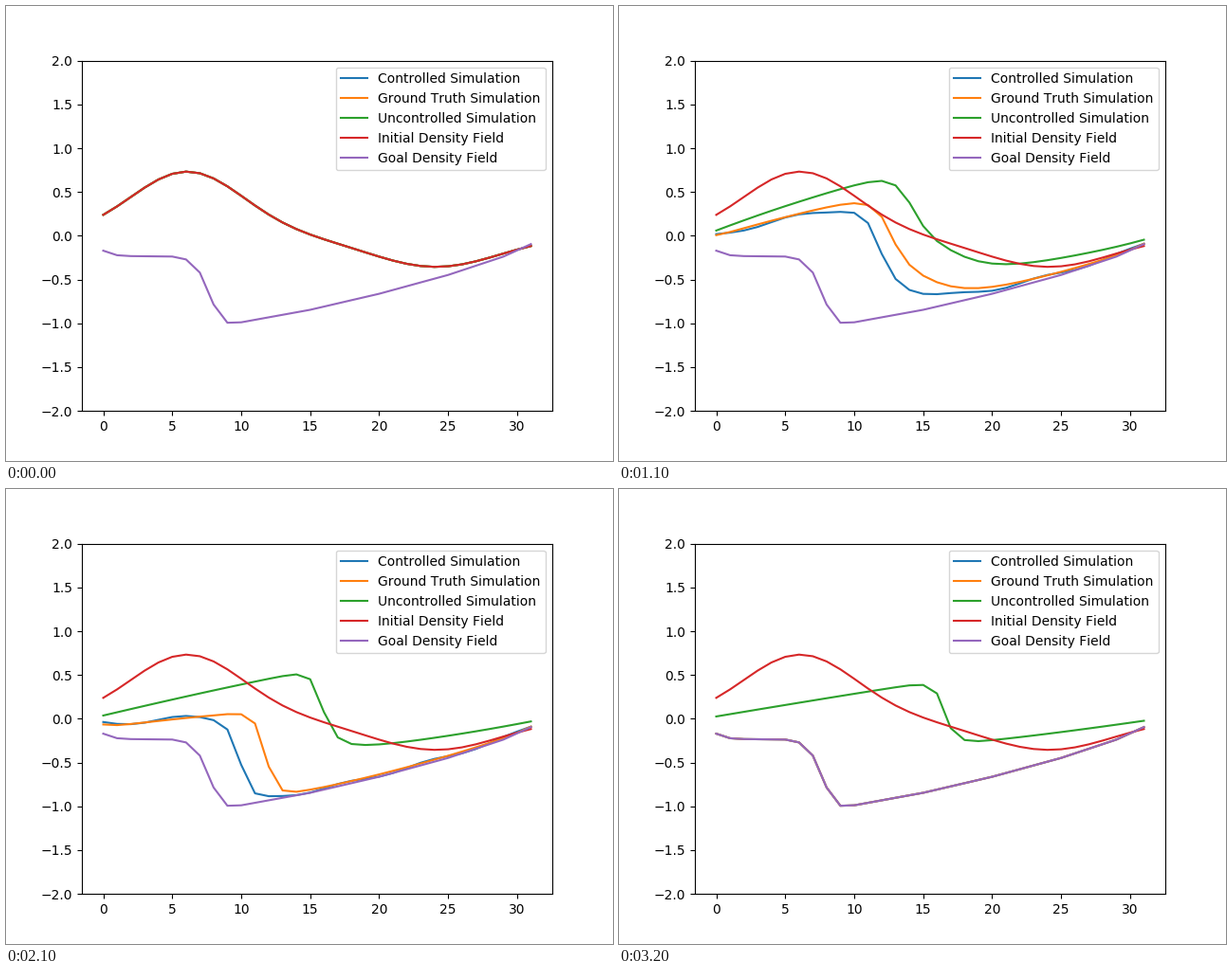
These frames come from a looping animation (640 px wide and 480 px high, 3300 ms). A matplotlib script:

```python
import numpy as np
import matplotlib.pyplot as plt
from matplotlib.animation import FuncAnimation

plt.rcParams["text.kerning_factor"] = 6

STEPS = 32
LANDING = 5         # steps in which the controlled run closes in on the goal
CFL = 0.96          # dt / dx
DIFFUSION = 0.075   # viscosity * dt / dx^2

x = np.arange(32)
x_pad = np.arange(-1, 33)


def bell(center, spread):
    return np.exp(-(x - center) ** 2 / spread)


initial = 0.733 * bell(6.08, 33) - 0.355 * bell(24.1, 43)
force = -0.03 * bell(15.5, 245)
goal = np.interp(
    x,
    [0, 1, 2, 5, 6, 7, 8, 9, 10, 15, 20, 25, 29, 31],
    [-.17, -.222, -.232, -.237, -.27, -.42, -.785, -.993, -.988,
     -.845, -.662, -.447, -.238, -.095])


def burgers(u, push):
    """Push, then advect (semi-Lagrangian) and diffuse; zero outside."""
    u = u + push
    v = np.interp(x - CFL * u, x_pad, np.pad(u, 1))
    p = np.pad(v, 1)
    return v + DIFFUSION * (p[2:] - 2 * v + p[:-2])


def simulate(push):
    """States for a push given as a function of step and state."""
    states = [initial]
    for n in range(STEPS):
        states.append(burgers(states[-1], push(n, states[-1])))
    return np.array(states)


def steer(n, u):
    """Pull to the goal, mostly right of the front; fade the force left of it."""
    right = 1 / (1 + np.exp((13 - x) / 1.5))
    fade = 1 - 0.6 * (1 - right) * n / STEPS
    return force * fade + (0.008 + 0.03 * right) * (goal - u)


time = np.arange(STEPS + 1)[:, None] / STEPS
uncontrolled = simulate(lambda n, u: 0)
truth = simulate(lambda n, u: force)
truth = truth + time ** 8 * (goal - truth[-1])

controlled = simulate(steer)
for n in range(STEPS - LANDING, STEPS):
    u = burgers(controlled[n], force)
    controlled[n + 1] = u + (goal - u) / (STEPS - n)
controlled += 0.02 * np.sin(np.pi * time) * np.cos(2 * np.pi * (x - 5.5) / 6)

fig, ax = plt.subplots(figsize=(6.4, 4.8), dpi=100)
runs = [
    (controlled, "Controlled Simulation"),
    (truth, "Ground Truth Simulation"),
    (uncontrolled, "Uncontrolled Simulation"),
]
lines = [ax.plot(x, run[0], label=name)[0] for run, name in runs]
ax.plot(x, initial, label="Initial Density Field")
ax.plot(x, goal, label="Goal Density Field")
ax.set_xlim(-1.55, 32.55)
ax.set_ylim(-2, 2)
ax.legend(loc="upper right")


def update(n):
    for line, (run, _) in zip(lines, runs):
        line.set_ydata(run[n])
    return lines


anim = FuncAnimation(fig, update, frames=STEPS + 1, interval=100,
                     repeat=True, repeat_delay=0)
plt.show()
```
